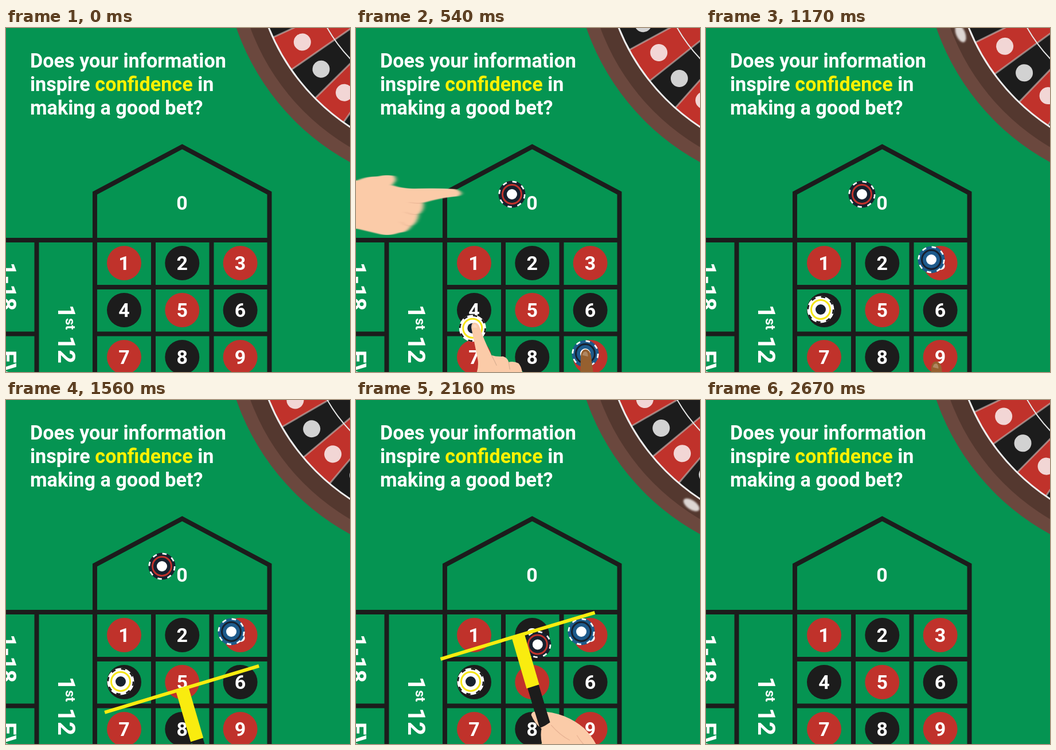
These frames come from a looping animation (600 by 600 pixels, 2700 ms). An HTML page:

```html
<!DOCTYPE html>
<html lang="en">
<head>
<meta charset="utf-8">
<title>Roulette table</title>
<style>
  html, body { margin: 0; width: 100%; height: 100%; overflow: hidden; background: #059452; }
  svg { display: block; width: 600px; height: 600px; }
  text { font-family: Roboto, Arial, sans-serif; font-weight: 700; fill: #fff; }
  .title { font-size: 34.2px; }
  .num { font-size: 34px; text-anchor: middle; }
  .line { fill: none; stroke: #1c1c1c; stroke-width: 8; }
  .crease { fill: none; stroke: #e8b394; stroke-width: 1.2; stroke-linecap: round; }
</style>
</head>
<body>
<svg viewBox="0 0 600 600">
  <defs>
    <filter id="soft" x="-50%" y="-50%" width="200%" height="200%"><feGaussianBlur stdDeviation="1.6"/></filter>
    <filter id="smear"><feGaussianBlur id="smearBy" stdDeviation="0 0"/></filter>
    <g id="pointer">
      <path d="M202 524Q201 515 207 514Q213 514 216 521Q224 545 237 571Q246 574 257 573Q265 575 267 583Q276 581 284 585Q289 590 291 602L318 720L238 720L211 602Q215 590 213 578Z"/>
      <path d="M204 523Q204 517 208 517Q211 518 212 523Z" fill="#fff" opacity=".25"/>
      <path d="M237 571Q242 580 246 589M267 583Q268 590 269 596" fill="none" stroke="#000" stroke-opacity=".14" stroke-width="1.2"/>
    </g>
  </defs>

  <rect width="600" height="600" fill="#059452"/>

  <g id="wheel" transform="translate(803.5 -139)">
    <circle r="425" fill="#6b483e"/>
    <circle r="402" fill="#54382f"/>
    <g id="spin"></g>
    <circle r="372" fill="none" stroke="#eee" stroke-width="3"/>
    <circle r="280" fill="none" stroke="#e6e6e6" stroke-width="2"/>
    <ellipse id="ball" cx="-389" rx="8" ry="16" fill="#ddd6d3" filter="url(#soft)"/>
  </g>

  <text class="title" x="42" y="69">Does your information</text>
  <text class="title" x="42" y="110">inspire <tspan fill="#fff200">confidence</tspan> in</text>
  <text class="title" x="42" y="151">making a good bet?</text>

  <path class="line" d="M155 604V288L307.300 207L459.500 288V604M0 370H459.500M155 452H459.500M155 533.500H459.500M257 370V604M358.500 370V604M53.500 370V604M0 533.500H53.500"/>
  <text class="num" x="307" y="317">0</text>
  <g id="numbers"></g>
  <g transform="rotate(90)">
    <text x="451" y="11" font-size="40" text-anchor="middle">1-18</text>
    <text x="562" y="11" font-size="40">EVEN</text>
    <text x="482.500" y="-90.500" font-size="42">1</text>
    <text x="506" y="-103.500" font-size="24">st</text>
    <text x="537" y="-90.500" font-size="42">12</text>
  </g>

  <g id="chips"></g>

  <g id="hand0" filter="url(#smear)">
    <path fill="#1c1c1c" d="M-400 250L-125 262V356L-400 372Z"/>
    <path fill="#fff" d="M-130 260L-104 262V355L-130 358Z"/>
    <path fill="#fbcba8" d="M-106 274L0 266Q18 258 36 259Q50 255 65 258Q69 262 67 267L62 274Q80 281 106 280Q142 279 172 281Q182 284 182 289Q180 294 170 294Q142 297 116 305Q118 318 108 325Q106 340 95 346Q88 357 74 357Q58 363 42 360L0 350L-106 344Z"/>
    <path class="crease" d="M116 305Q104 307 92 304M108 325Q97 327 85 321M95 346Q84 345 77 338"/>
  </g>
  <g id="hand1"><use href="#pointer" fill="#fbcba8"/></g>
  <g id="hand2"><use href="#pointer" fill="#96602f" transform="translate(402 564) rotate(13) scale(1.25) translate(-208 -515)"/></g>

  <g id="rake">
    <path d="M268 344L362 668" stroke="#1c1c1c" stroke-width="20"/>
    <path fill="#1c1c1c" d="M432 606L468 588L545 644L545 720L470 720Z"/>
    <path fill="#fff" d="M394 602L448 569L468 590L430 630Z"/>
    <path fill="#f9c6a2" d="M284 446Q270 453 271 466Q273 478 282 485Q279 496 284 507Q282 517 296 527Q297 541 309 552Q317 560 322 553L318 530L335 500Z"/>
    <path fill="#fbcba8" d="M265 396Q266 389 275 390Q299 389 322 398Q342 406 357 419Q372 434 379 449Q385 464 388 476Q391 491 397 504Q406 522 421 540L449 570L399 603Q372 591 349 577Q334 560 328 540Q313 525 306 505Q291 480 286 455Q280 435 283 420Q271 411 265 396Z"/>
    <path class="crease" d="M282 485Q292 488 296 482M284 507Q296 512 302 506M296 527Q306 530 311 524M300 414Q316 432 332 440M345 432Q357 452 372 458"/>
    <path fill="#1c1c1c" d="M258 347L277 342L298 409Q290 415 280 419Z"/>
    <path fill="#f9ec0f" d="M231 261L253 254L279 343L257 350Z"/>
    <path d="M107 298.500L376 217.500" stroke="#f9ec0f" stroke-width="6"/>
  </g>
</svg>

<script>
const NS = 'http://www.w3.org/2000/svg';
const LOOP = 2700, STEP = 30;
const RED = '#c0322b', BLACK = '#1c1c1c';
const $ = id => document.getElementById(id);

function add(parent, tag, attrs, text) {
  const el = document.createElementNS(NS, tag);
  for (const k in attrs) el.setAttribute(k, attrs[k]);
  if (text !== undefined) el.textContent = text;
  return parent.appendChild(el);
}

function buildWheel() {
  const at = (r, deg) => {
    const a = deg * Math.PI / 180;
    return [-r * Math.cos(a), r * Math.sin(a)];
  };
  for (let i = 0; i < 36; i++) {
    add($('spin'), 'path', {
      d: `M0 0L${at(372, i * 10 - 5)}A372 372 0 0 0 ${at(372, i * 10 + 5)}Z`,
      fill: i % 2 ? RED : BLACK
    });
  }
  for (let i = 0; i < 36; i++) {
    const [x, y] = at(372, i * 10 + 5);
    add($('spin'), 'path', { d: `M0 0L${x} ${y}`, stroke: '#c9bebb', 'stroke-width': 3, opacity: 0.6 });
    const [cx, cy] = at(330, i * 10);
    add($('spin'), 'circle', { cx, cy, r: 15, fill: '#fff', opacity: 0.8 });
  }
}

function buildNumbers() {
  for (let i = 0; i < 9; i++) {
    const x = 206 + (i % 3) * 101.3, y = 410 + Math.floor(i / 3) * 82;
    add($('numbers'), 'circle', { cx: x, cy: y, r: 30, fill: i % 2 ? BLACK : RED });
    add($('numbers'), 'text', { class: 'num', x, y: y + 12 }, i + 1);
  }
}

function buildChip({ body, dash, ring, core, mark }) {
  const g = add($('chips'), 'g', {});
  add(g, 'circle', { r: 23.5, fill: body });
  add(g, 'circle', { r: 22.2, fill: 'none', stroke: dash, 'stroke-width': 2.7, 'stroke-dasharray': '7.500 9.936' });
  add(g, 'circle', { r: 16.5, fill: core, stroke: ring, 'stroke-width': 3 });
  add(g, 'circle', { r: 9, fill: mark });
  return g;
}

// Piecewise [time, value] track with smooth easing between keys
function track(t, keys) {
  if (t <= keys[0][0]) return keys[0][1];
  for (let i = 1; i < keys.length; i++) {
    const [t0, a] = keys[i - 1], [t1, b] = keys[i];
    if (t < t1) {
      const u = (t - t0) / (t1 - t0);
      return a + (b - a) * u * u * (3 - 2 * u);
    }
  }
  return keys[keys.length - 1][1];
}

// rest: chip on the table; away: distance hidden; end: hand offset when placing
const bets = [
  { rest: [272, 290], away: [-298, 0], end: [98, 0], times: [0, 330, 375, 809],
    body: '#17202e', dash: '#fff', ring: RED, core: '#17202e', mark: '#fff' },
  { rest: [200, 491], away: [16, 158], end: [-4, -33], times: [296, 641, 680, 1010],
    body: '#fff', dash: BLACK, ring: '#f5e616', core: '#fff', mark: '#17202e' },
  { rest: [393, 404], away: [10, 236], end: [-7, -166], times: [397, 787, 862, 1302],
    body: '#1d5b8c', dash: '#fff', ring: '#17202e', core: '#1d5b8c', mark: '#fff' }
];
const SWEEP = 1840;
const rakeKeys = [[1380, 400], [1821, 0], [SWEEP, 0], [2607, 420]];

// How far a hand is from its chip's place: 1 hidden, 0 there
function distance({ times: [t0, t1, t2, t3] }, t) {
  return track(t, [[t0, 1], [t1, 0], [t2, 0], [t3, 1]]);
}

function place(el, x, y) {
  el.setAttribute('transform', `translate(${x} ${y})`);
}

function draw(t) {
  const n = t / STEP;
  $('spin').setAttribute('transform', `rotate(${2.0135 * n - 39.7})`);
  $('ball').setAttribute('transform', `rotate(${82.4 - 11.92 * n})`);

  const s = track(t, rakeKeys);
  place($('rake'), s * 0.256, s * 0.968);

  // the side hand smears with its speed
  const speed = Math.abs(distance(bets[0], t) - distance(bets[0], t - STEP));
  $('smearBy').setAttribute('stdDeviation', `${speed * 40} 0`);

  bets.forEach((b, i) => {
    const far = distance(b, t);
    const dx = b.away[0] * far, dy = b.away[1] * far;
    place($('hand' + i), b.end[0] + dx, b.end[1] + dy);

    let [x, y] = b.rest;
    if (t < b.times[1]) {
      x += dx;
      y += dy;
    } else if (t > SWEEP) {
      // the bar pushes a chip once it touches its rim
      const gap = (x - 241.5) * 0.288 + (y - 257.5) * 0.957;
      const push = Math.max(0, s + 25 - gap);
      x += push * 0.3125;
      y += push * 0.951;
    }
    place(b.el, x, y);
  });
}

buildWheel();
buildNumbers();
bets.forEach(b => { b.el = buildChip(b); });

const start = performance.now();
function frame() {
  const t = (performance.now() - start) % LOOP;
  draw(Math.floor(t / STEP) * STEP);
  requestAnimationFrame(frame);
}
draw(0);
requestAnimationFrame(frame);
</script>
</body>
</html>
```
